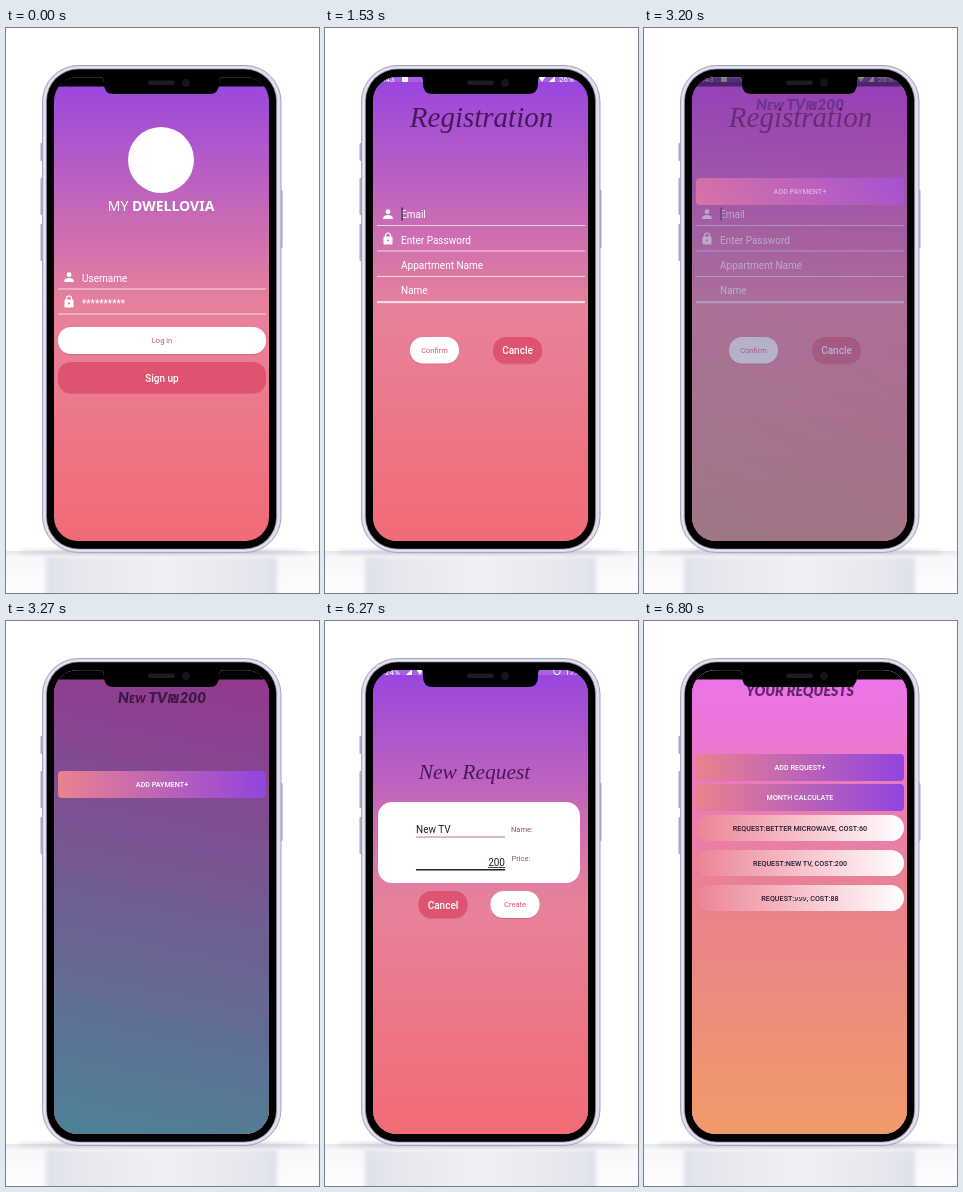
These frames come from a looping animation (313 by 565 pixels, 8 s). An HTML page:

```html
<!DOCTYPE html>
<html lang="en">
<head>
<meta charset="utf-8">
<title>Apartment app</title>
<style>
html, body { margin: 0; width: 100%; height: 100%; overflow: hidden; background: #fff; }
svg { display: block; width: 100%; height: 100%; }
text { font: 10px Roboto, sans-serif; fill: #fff; }
.small { font-size: 7.5px; }
.caps { font-size: 7.2px; font-weight: 500; }
.medium { font-weight: 500; }
.brand { font: 14px "Noto Sans", sans-serif; }
.brand .bold { font-weight: 600; }
.script { font: italic 29px "Liberation Serif", serif; }
.script.compact { font-size: 21.5px; }
.marker { font: italic 900 14.2px Lato, "DejaVu Sans", sans-serif; }
.marker.mixed { font-size: 15.2px; font-variant: small-caps; }
.mini { font-size: 8px; }
</style>
</head>
<body>
<svg viewBox="0 0 313 565" preserveAspectRatio="none">
  <defs>
    <linearGradient id="sunset" x2="0" y2="1">
      <stop stop-color="#9845e0"/><stop offset=".5" stop-color="#e7829b"/><stop offset="1" stop-color="#f26b76"/>
    </linearGradient>
    <linearGradient id="dusk" gradientUnits="userSpaceOnUse" x1="205" y1="49" x2="106" y2="513">
      <stop stop-color="#94388f"/><stop offset="1" stop-color="#4e8196"/>
    </linearGradient>
    <linearGradient id="peach" x2="0" y2="1">
      <stop stop-color="#ec73f0"/><stop offset=".5" stop-color="#e9828d"/><stop offset="1" stop-color="#f09b69"/>
    </linearGradient>
    <linearGradient id="violet">
      <stop stop-color="#e9828f"/><stop offset="1" stop-color="#9045de"/>
    </linearGradient>
    <linearGradient id="blush">
      <stop stop-color="#ec8494"/><stop offset="1" stop-color="#fff"/>
    </linearGradient>
    <linearGradient id="floor" x2="0" y2="1">
      <stop stop-color="#e6e8ee"/><stop offset=".15" stop-color="#f8f8fb"/><stop offset="1" stop-color="#fdfdfe"/>
    </linearGradient>
    <linearGradient id="reflection">
      <stop stop-color="#dfe0e9"/><stop offset=".12" stop-color="#e6e7ee"/><stop offset=".5" stop-color="#eff0f5"/>
      <stop offset=".88" stop-color="#e6e7ee"/><stop offset="1" stop-color="#dfe0e9"/>
    </linearGradient>
    <clipPath id="display"><rect x="48" y="49" width="215" height="464" rx="24"/></clipPath>
    <filter id="shadow" x="-10%" y="-20%" width="120%" height="150%">
      <feDropShadow dx="0" dy=".7" stdDeviation=".6" flood-color="#602" flood-opacity=".25"/>
    </filter>
    <filter id="soft" x="-10%" y="-200%" width="120%" height="500%"><feGaussianBlur stdDeviation="2"/></filter>
  </defs>

  <rect width="313" height="565" fill="#fff"/>
  <rect y="523" width="313" height="42" fill="url(#floor)"/>
  <ellipse cx="156" cy="524" rx="145" ry="2" fill="#b9bbca" filter="url(#soft)"/>
  <rect x="40" y="529" width="231" height="50" fill="url(#reflection)" filter="url(#soft)"/>

  <g fill="#aaa9bd">
    <rect x="34.500" y="115" width="3" height="18" rx="1"/>
    <rect x="34.500" y="150" width="3" height="37" rx="1"/>
    <rect x="34.500" y="196" width="3" height="37" rx="1"/>
    <rect x="273.500" y="162" width="3" height="58" rx="1"/>
  </g>
  <rect x="36.500" y="37.500" width="238.500" height="487" rx="36" fill="#d9d7e8" stroke="#a6a5bc"/>
  <rect x="38.500" y="39.500" width="234.500" height="483" rx="34" fill="none" stroke="#eceaf6"/>
  <rect x="40.500" y="41" width="230" height="480" rx="32" stroke="#8f8ea6" stroke-width=".6"/>
  <g id="screens" clip-path="url(#display)"></g>
  <path d="M94 48q4 0 4 5v3q0 10 10 10h95q10 0 10-10v-3q0-5 4-5z"/>
  <rect x="142" y="52.500" width="27" height="4.500" rx="2.200" fill="#1c1c22"/>
  <circle cx="180" cy="55" r="4" fill="#15151c"/>
</svg>

<script>
const ROSE = '#dd5270';
const INK = '#2b1730';
const SCRIPT_INK = '#48195a';
const LOOP = 8000;
const STEP = 200 / 3;

const text = (x, y, value, cls = '', fill = '#fff', anchor = 'start') =>
  `<text x="${x}" y="${y}" class="${cls}" text-anchor="${anchor}" style="fill:${fill}">${value}</text>`;
const centered = (x, y, value, cls, fill) => text(x, y, value, cls, fill, 'middle');
const rect = (x, y, w, h, fill, rx = 0, attrs = '') =>
  `<rect x="${x}" y="${y}" width="${w}" height="${h}" rx="${rx}" fill="${fill}" ${attrs}/>`;
const rule = (y, h = 1) => rect(52, y, 208, h, '#fff', 0, 'opacity=".7"');
const backdrop = id => rect(48, 49, 215, 464, `url(#${id})`);

const button = (x, y, w, h, label, white) =>
  rect(x, y, w, h, white ? '#fff' : ROSE, 13, 'filter="url(#shadow)"') +
  centered(x + w / 2, y + h / 2 + (white ? 2.6 : 4), label, white ? 'small' : 'medium', white ? ROSE : '#fff');
const bar = (y, label) =>
  rect(52, y, 208, 27, 'url(#violet)', 4) + centered(156, y + 16.2, label, 'caps');
const pill = (y, label) =>
  rect(52, y, 208, 26, 'url(#blush)', 13) + centered(156, y + 15.7, label, 'caps', INK);

const person = y => `<g fill="#fff"><circle cx="63" cy="${y - 2.3}" r="2.4"/>
  <path d="M58.300 ${y + 5}v-1.300c0-3.600 9.400-3.600 9.400 0v1.300z"/></g>`;
const lock = y => `${rect(58.5, y - 2.5, 9, 8, '#fff', 1)}
  <path d="M60.500 ${y - 2}v-1.500a2.500 2.500 0 0 1 5 0v1.500" fill="none" stroke="#fff" stroke-width="1.200"/>
  <circle cx="63" cy="${y + 1.5}" r="1" fill="#d5719f"/>`;
const darkStatus = rect(48, 49, 215, 9.5, '#000') +
  '<path d="M49 62q1-12.700 20-12.700h25q4 0 4 5M213 54q0-4.700 4-4.700h25q19 0 20 12.700" fill="none" stroke="#666" stroke-width=".5"/>';
const lightStatus = rect(48, 49, 215, 5, '#fff', 0, 'opacity=".15"');
const signal = x => `<path d="M${x} 54h6v-6z" fill="#fff"/>`;
const wifi = x => `<path d="M${x} 48h8l-4 6z" fill="#fff"/>`;

const login = backdrop('sunset') + darkStatus +
  '<circle cx="155" cy="132" r="33" fill="#fff"/>' +
  centered(155, 183, 'MY <tspan class="bold">DWELLOVIA</tspan>', 'brand') +
  person(249) + text(76, 253.5, 'Username') + rule(260.5) +
  lock(274) + text(76, 278.5, '**********') + rule(285.5) +
  button(52, 299, 208, 27, 'Log in', true) +
  button(52, 334, 208, 31, 'Sign up');

const registration = backdrop('sunset') + lightStatus +
  text(54, 54, '7:43', 'mini') + rect(77, 48, 6, 6, '#fff', 1) +
  wifi(213) + signal(224) + text(234, 54, '26%', 'mini') +
  centered(156.5, 99, 'Registration', 'script', SCRIPT_INK) +
  person(186) + text(76, 190, 'Email') + rect(76.5, 179.5, 1.2, 13, INK) + rule(197) +
  lock(211) + text(76, 215.5, 'Enter Password') + rule(222.5) +
  text(76, 241, 'Appartment Name') + rule(248) +
  text(76, 266.3, 'Name') + rule(273, 2.2) +
  button(85, 309, 49, 26.5, 'Confirm', true) +
  button(168, 309, 49, 26.5, 'Cancle');

const payment = backdrop('dusk') + darkStatus +
  centered(156, 81.5, 'New TV₪200', 'marker mixed', '#3b1a46') +
  bar(150, 'ADD PAYMENT+');

const newRequest = backdrop('sunset') + lightStatus +
  text(60, 54, '24%', 'mini') + signal(81) + wifi(91) +
  '<circle cx="232" cy="50.500" r="3.200" fill="none" stroke="#fff"/>' + text(240, 54, '17:4', 'mini') +
  centered(149.5, 158, 'New Request', 'script compact', SCRIPT_INK) +
  rect(53, 181, 202, 81, '#fff', 14) +
  text(91, 212, 'New TV', '', INK) + rect(91, 215.5, 89, 1, '#b5788d') +
  text(180, 245, '200', '', INK, 'end') +
  rect(163, 246, 17, .8, INK) + rect(91, 248, 89, 1.5, INK) +
  text(186, 211, 'Name:', 'small', '#91516b') +
  text(186.5, 239.5, 'Price:', 'small', '#91516b') +
  button(93.5, 270, 49, 27, 'Cancel') +
  button(165.5, 270, 49, 27, 'Create', true);

const requests = backdrop('peach') + darkStatus +
  centered(156, 75, 'YOUR REQUESTS', 'marker', '#65266a') +
  bar(133, 'ADD REQUEST+') + bar(163, 'MONTH CALCULATE') +
  pill(194, 'REQUEST:BETTER MICROWAVE, COST:60') +
  pill(229, 'REQUEST:NEW TV, COST:200') +
  pill(264, 'REQUEST:עעע, COST:88');

// Each screen covers the previous one, blending in over a number of steps.
const scenes = [
  { art: login, start: 0, steps: 1 },
  { art: registration, start: 1330, steps: 4 },
  { art: payment, start: 3200, steps: 2 },
  { art: newRequest, start: 4800, steps: 1 },
  { art: requests, start: 6400, steps: 2 },
];
const holder = document.getElementById('screens');
holder.innerHTML = scenes.map(scene => `<g>${scene.art}</g>`).join('');

function draw(now) {
  const time = now % LOOP;
  scenes.forEach(({ start, steps }, i) => {
    const progress = (Math.floor((time - start) / STEP) + 1) / steps;
    holder.children[i].setAttribute('opacity', Math.max(0, Math.min(1, progress)));
  });
}

const origin = performance.now();
function tick() {
  draw(performance.now() - origin);
  requestAnimationFrame(tick);
}
tick();
</script>
</body>
</html>
```
